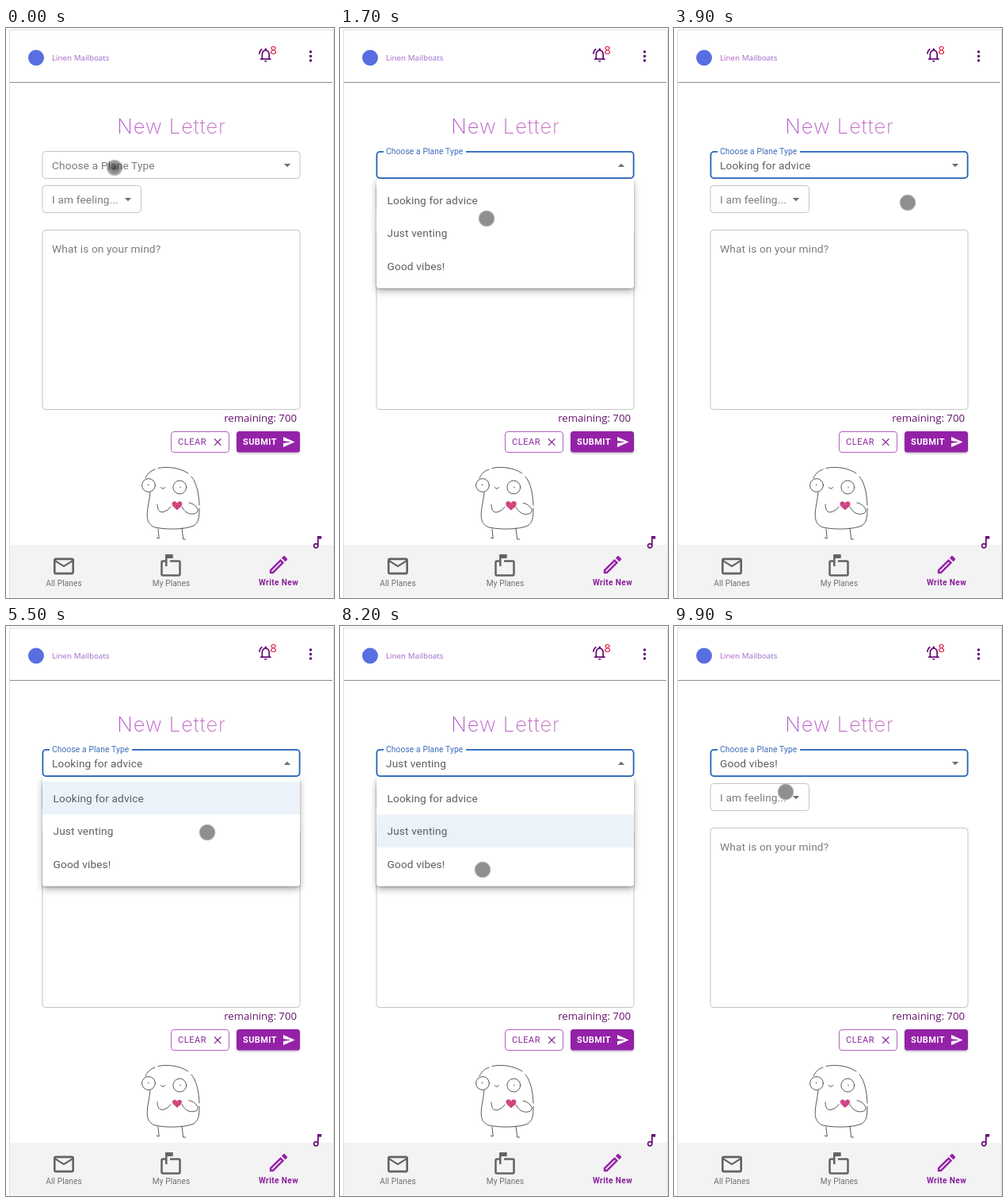
An HTML page that plays this animation: 414 px wide and 718 px high, repeating every 10 s.

```html
<!DOCTYPE html>
<html lang="en">
<head>
<meta charset="utf-8">
<title>New Letter</title>
<style>
  html, body { margin: 0; width: 100%; height: 100%; overflow: hidden; background: #fff; }
  svg { display: block; width: 414px; height: 718px; }
  text { font-family: Roboto, sans-serif; }
  .field { font-size: 13.7px; letter-spacing: .14px; fill: #7b7b7b; }
  .value, .item { font-size: 13.7px; letter-spacing: .13px; fill: #5e5e5e; }
  .box { fill: none; stroke: #c4c4c4; }
  .caret { fill: #707070; }
  .nav { font-size: 10.1px; letter-spacing: .1px; fill: #707070; text-anchor: middle; }
  .button { font-size: 11px; letter-spacing: .4px; }
  .open-sans { font-family: "Open Sans", sans-serif; }
  .ink { fill: none; stroke: #3c3c3c; stroke-width: .85; stroke-linecap: round; stroke-linejoin: round; }
</style>
</head>
<body>
<svg viewBox="0 0 414 718" xmlns="http://www.w3.org/2000/svg">
  <defs>
    <linearGradient id="brand"><stop stop-color="#b45cc8"/><stop offset="1" stop-color="#8b66c9"/></linearGradient>
    <linearGradient id="heading"><stop stop-color="#b458cc"/><stop offset="1" stop-color="#c874c4"/></linearGradient>
    <filter id="shadow" x="-10%" y="-10%" width="120%" height="130%">
      <feDropShadow dx="0" dy="1.5" stdDeviation="1.2" flood-opacity=".22"/>
      <feDropShadow dx="0" dy="4" stdDeviation="4.5" flood-opacity=".3"/>
    </filter>
    <filter id="lift" x="-10%" y="-20%" width="120%" height="160%">
      <feDropShadow dx="0" dy="1.3" stdDeviation="1" flood-opacity=".28"/>
    </filter>
    <radialGradient id="touch">
      <stop offset=".8" stop-color="#111" stop-opacity=".47"/>
      <stop offset=".9" stop-color="#111" stop-opacity=".3"/>
      <stop offset="1" stop-color="#111" stop-opacity="0"/>
    </radialGradient>
    <radialGradient id="press">
      <stop offset="0" stop-opacity=".42"/><stop offset="1" stop-opacity="0"/>
    </radialGradient>
  </defs>

  <rect width="414" height="718" fill="#fff"/>
  <path d="M4.5 718V2.5H414M413.5 2V718" fill="none" stroke="#dedede"/>

  <!-- header -->
  <circle cx="38" cy="37.5" r="10" fill="#596ee0"/>
  <text x="58" y="40.5" font-size="9.8" class="open-sans" fill="url(#brand)">Linen Mailboats</text>
  <path fill="#650f78" transform="translate(317.2 23.4) scale(.88)" d="M12 22c1.1 0 2-.9 2-2h-4c0 1.1.9 2 2 2zm6-6v-5c0-3.07-1.63-5.64-4.5-6.32V4c0-.83-.67-1.5-1.5-1.5s-1.5.67-1.5 1.5v.68C7.64 5.36 6 7.92 6 11v5l-2 2v1h16v-1l-2-2zm-2 1H8v-6c0-2.48 1.51-4.5 4-4.5s4 2.02 4 4.5v6zM7.58 4.08L6.15 2.65C3.75 4.48 2.17 7.3 2.03 10.5h2c.15-2.65 1.51-4.97 3.55-6.42z"/>
  <text x="333.2" y="33" font-size="15" class="open-sans" fill="#e00d35">8</text>
  <path d="M384.5 30v0M384.5 35.5v0M384.5 41v0" stroke="#650f78" stroke-width="3.6" stroke-linecap="round"/>
  <path d="M5 68.5H412" stroke="#8d8d8d"/>

  <text x="209" y="133" font-size="25.5" font-weight="200" letter-spacing="1" text-anchor="middle" fill="url(#heading)" style="font-family:Inter,sans-serif">New Letter</text>

  <!-- form -->
  <rect id="selectBox" class="box" x="46" y="155.5" width="325" height="34" rx="4"/>
  <rect id="notch" x="55" y="153" width="104" height="5" fill="#fff"/>
  <text id="label" class="field">Choose a Plane Type</text>
  <text id="value" class="value" x="58" y="178"></text>
  <path id="caret" class="caret" d="M-4.2-2h8.4L0 2.2z"/>

  <rect class="box" x="46" y="198.5" width="124.5" height="34" rx="4"/>
  <text class="field" x="58" y="221">I am feeling...</text>
  <path class="caret" d="M149.8 214h8.4l-4.2 4.2z"/>

  <rect class="box" x="46" y="254.5" width="325" height="226" rx="4"/>
  <text class="field" x="58" y="283">What is on your mind?</text>
  <text x="367" y="496" font-size="13.2" font-weight="500" text-anchor="end" class="open-sans" fill="#64146c">remaining: 700</text>

  <rect x="208.5" y="508.5" width="73" height="26" rx="3.5" fill="#fff" stroke="#b263bd"/>
  <text class="button" x="217" y="524.5" fill="#8a259c" style="letter-spacing:.55px">CLEAR</text>
  <path d="M263 517.5l8.4 8.4m0-8.4l-8.4 8.4" stroke="#8a259c" stroke-width="1.25"/>
  <rect x="291" y="508" width="80" height="26.5" rx="3.5" fill="#9422a8" filter="url(#lift)"/>
  <text class="button" x="299" y="524.5" font-weight="700" fill="#fff">SUBMIT</text>
  <path d="M350 528l14.5-6.5L350 515v5l10 1.5-10 1.5z" fill="#fff"/>

  <!-- doodle -->
  <g class="ink">
    <path d="M176 567C178 562 182 558 188 556M192 554.5C203 552 219 553.5 230 561M234 565C241 573 243.5 588 244 601M244 605C244 617 243 623 237 627C225 632 202 632 188 629C177 625 177.5 615 179 604Q181 594 182 585"/>
    <circle cx="180" cy="576" r="8.4"/>
    <circle cx="219.3" cy="578.5" r="8.4"/>
    <path d="M195.5 578.5q2.5 4 5 0M179.5 575v1M220 578v1"/>
    <path d="M192 631l1.2 12-3-1M222 630l1.7 14 3 0"/>
    <path id="arms" d="M191 600C191 606 193 611 199 609.5Q205 608 208 603M222 603C225 609 230 613 237 612Q243 611 242 606Q238 599 231 598"/>
  </g>
  <g id="heart">
    <path d="M0 5.8C-3 3-6.5 1-6.3-2C-6-5.2-2-6 0-2.8C2-6 6-5.2 6.3-2C6.5 1 3 3 0 5.8z" fill="#dc4a80"/>
    <path d="M-3.5-2v0M2.8-2.6v0M-.8.8v0M3 .8v0M.2 3.2v0" stroke="#93369b" stroke-width="1.7" stroke-linecap="round"/>
  </g>

  <!-- bottom navigation -->
  <rect x="5" y="651" width="408" height="66" fill="#f3f3f3"/>
  <path fill="#650f78" fill-rule="evenodd" transform="translate(382.4 637.3) scale(.88)" d="M12 3v10.55c-.59-.34-1.27-.55-2-.55-2.21 0-4 1.79-4 4s1.79 4 4 4 4-1.79 4-4V7h4V3h-6zm-2 16c-1.1 0-2-.9-2-2s.9-2 2-2 2 .9 2 2-.9 2-2 2z"/>
  <path fill="#636363" transform="translate(57.4 662.4) scale(1.3)" d="M22 6c0-1.1-.9-2-2-2H4c-1.1 0-2 .9-2 2v12c0 1.1.9 2 2 2h16c1.1 0 2-.9 2-2V6zm-2 0l-8 5-8-5h16zm0 12H4V8l8 5 8-5v10z"/>
  <g fill="none" stroke="#636363" stroke-width="2.5">
    <path d="M201 671.5H198q-1.5 0-1.5 1.5v15q0 1.5 1.5 1.5h20q1.5 0 1.5-1.5v-15q0-1.5-1.5-1.5H207"/>
    <path d="M202.3 678v-15"/>
    <path d="M202 665.5h8.7" stroke-width="5"/>
  </g>
  <path fill="#9422a8" transform="translate(329.1 661.2) scale(1.24)" d="M14.06 9.02l.92.92L5.92 19H5v-.92l9.06-9.06M17.66 3c-.25 0-.51.1-.7.29l-1.83 1.83 3.75 3.75 1.83-1.83c.39-.39.39-1.02 0-1.41l-2.34-2.34c-.2-.2-.45-.29-.71-.29zm-3.6 3.19L3 17.25V21h3.75L17.81 9.94l-3.75-3.75z"/>
  <text class="nav" x="73" y="702.5">All Planes</text>
  <text class="nav" x="208.5" y="702.5">My Planes</text>
  <text class="nav" x="344" y="702" style="font-weight:700;fill:#8a1f9c;letter-spacing:.4px">Write New</text>

  <g id="menu">
    <rect x="46" y="190" width="325" height="137.5" rx="3.5" fill="#fff" filter="url(#shadow)"/>
    <rect id="selected" x="46" width="325" height="41.5" fill="#ebf2fa"/>
    <g id="items"></g>
  </g>

  <g id="cursor">
    <circle id="touchDot" r="10.8" fill="url(#touch)"/>
    <circle id="pressDot" r="9" fill="url(#press)"/>
  </g>
</svg>
<script>
  const LOOP = 10000, STEP = 100, ROW = 41.5;
  const options = ['Looking for advice', 'Just venting', 'Good vibes!'];
  const openings = [[700, 3450], [4800, 5750], [6900, 9050]];
  // time, x, y
  const route = [
    [0, 137, 176], [800, 137, 176], [1700, 185, 240], [2300, 190, 238], [3200, 293, 218],
    [3900, 295, 220], [4600, 300, 179], [4900, 300, 179], [5500, 254, 260], [5800, 254, 260],
    [6500, 353, 184], [7300, 353, 184], [8200, 180, 307], [8700, 126, 302],
    [9200, 130, 300], [9900, 141, 209], [LOOP, 137, 176]
  ];

  const $ = id => document.getElementById(id);
  const set = (id, attrs) => {
    for (const name in attrs) $(id).setAttribute(name, attrs[name]);
  };
  const clamp = v => Math.max(0, Math.min(1, v));
  const ease = v => v * v * (3 - 2 * v);
  const ramp = (t, start, length) => ease(clamp((t - start) / length));
  const mix = (a, b, k) => a + (b - a) * k;

  $('items').innerHTML = options.map((name, i) =>
    `<text class="item" x="59.5" y="${221.5 + i * ROW}">${name}</text>`).join('');

  function cursorAt(t) {
    const i = route.findIndex(point => point[0] > t);
    const [t0, x0, y0] = route[i - 1], [t1, x1, y1] = route[i];
    const k = ease((t - t0) / (t1 - t0));
    return [mix(x0, x1, k), mix(y0, y1, k)];
  }

  function render(t) {
    const focused = t >= openings[0][0];
    const open = openings.some(([a, b]) => t >= a && t < b);
    const shown = Math.max(...openings.map(([a, b]) => ramp(t, a, 250) * (1 - ramp(t, b, 200))));
    const choice = openings.filter(span => t >= span[1]).length - 1;
    const shrink = ramp(t, openings[0][0], 200);

    // The focus ring is thicker but keeps the same outer edge.
    const inset = focused ? .4 : 0;
    set('selectBox', {
      x: 46 + inset, y: 155.5 + inset, width: 325 - 2 * inset, height: 34 - 2 * inset,
      style: focused ? 'stroke:#2262ba;stroke-width:1.8' : ''
    });
    set('notch', { opacity: shrink });
    set('label', {
      transform: `translate(58 ${mix(178, 159, shrink)}) scale(${mix(1, .75, shrink)})`,
      style: focused ? 'fill:#3e6cba' : ''
    });
    $('value').textContent = options[choice] || '';
    set('caret', { transform: `translate(355 173) scale(1 ${open ? -1 : 1})` });

    set('menu', {
      opacity: shown,
      transform: `translate(0 190) scale(1 ${mix(.8, 1, shown)}) translate(0 -190)`
    });
    set('selected', { y: 196 + Math.max(choice, 0) * ROW, opacity: choice < 0 ? 0 : 1 });

    const beat = Math.sin(t / LOOP * Math.PI * 2 * 14);
    set('heart', { transform: `translate(216 601.3) scale(${1.03 + .07 * beat})` });
    set('arms', { transform: `translate(0 ${.4 * beat})` });

    const [x, y] = cursorAt(t);
    const clicking = t < 300 || openings.flat().some(click => Math.abs(t - click) < 150)
      || (t >= 6500 && t < 6900);
    set('cursor', { transform: `translate(${x} ${y})` });
    set('touchDot', { opacity: clicking ? .8 : 1 });
    set('pressDot', { opacity: clicking ? 1 : 0 });
  }

  const begin = performance.now();
  function tick() {
    const elapsed = (performance.now() - begin) % LOOP;
    render(Math.floor(elapsed / STEP) * STEP);
    requestAnimationFrame(tick);
  }
  tick();
</script>
</body>
</html>
```
